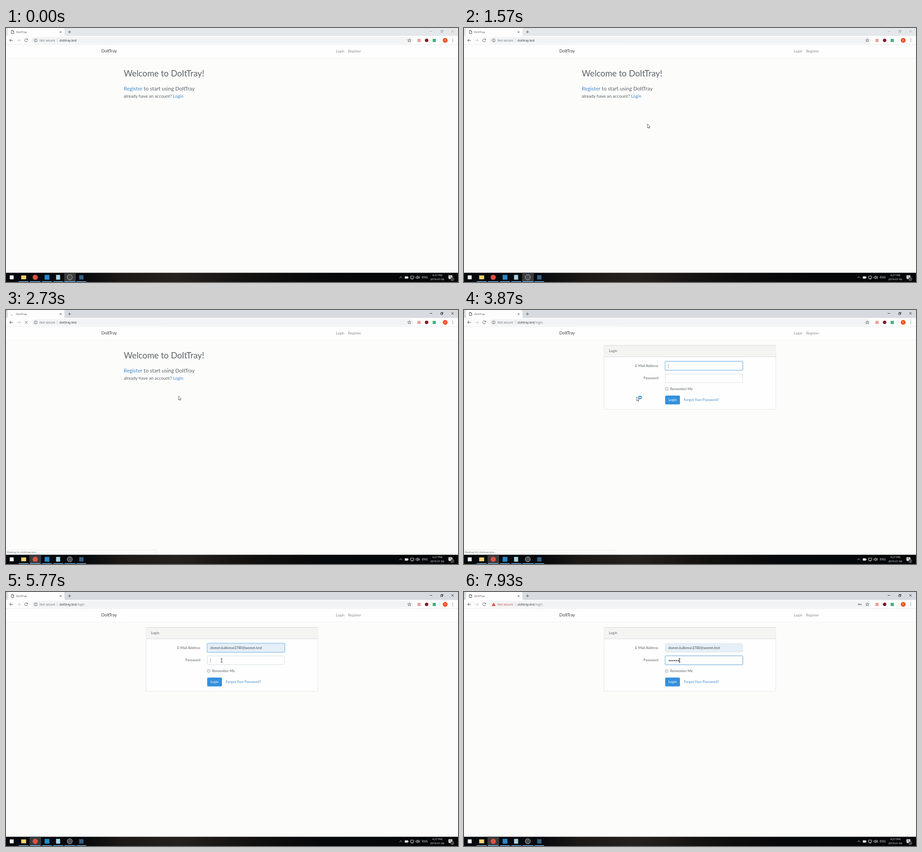
These frames come from a looping animation (998 px wide and 561 px high, 8 s). An HTML page:

```html
<!DOCTYPE html>
<html lang="en">
<head>
<meta charset="utf-8">
<title>DoItTray</title>
<style>
html, body { margin: 0; width: 100%; height: 100%; overflow: hidden; background: #fcfcfb; }
svg { display: block; width: 998px; height: 561px; }
text { font-family: "Open Sans", "Noto Sans", sans-serif; }
.page text { font: 7.8px Lato, sans-serif; fill: #5d6468; }
.page .title { font-size: 18.7px; }
.page .lead { font-size: 11.6px; }
.page .sub { font-size: 9.7px; }
.page .brand { font-size: 9.3px; fill: #3c3f42; }
.page .nav { font-size: 7.95px; fill: #85888a; }
.page .link { fill: #4389cf; }
.page .mail { font-size: 7.6px; fill: #44494d; }
.ui { font-size: 6.8px; fill: #6a6d70; }
.small { font-size: 5.9px; }
.line { fill: none; stroke: #55585c; stroke-width: 1; }
.white { fill: none; stroke: #e8e8e8; stroke-width: .9; }
.field { fill: #fefefe; stroke: #cfd6dc; stroke-width: .8; }
.glow { fill: none; stroke: #a1cbef; stroke-width: 1; }
.halo { fill: none; stroke: #3490dc; stroke-opacity: .28; stroke-width: 2; }

/* on/off states */
.step { animation: 8s step-end infinite; }
.blurred { animation-name: blurred; }
.focused { animation-name: focused; }
.idle { animation-name: idle; }
.loading { animation-name: loading; }
.status { animation-name: status; }
.home { animation-name: home; }
.login { animation-name: login; }
.arrow { animation-name: arrow; }
.beam { animation-name: beam; }
.busy { animation-name: busy; }
.mailcaret { animation-name: mailcaret; }
.suggest { animation-name: suggest; }
.filled { animation-name: filled; }
.safe { animation-name: safe; }
.warned { animation-name: warned; }
.passcaret { animation-name: passcaret; }
.typed { animation-name: typed; }
@keyframes blurred { 0% { opacity: 1 } 26.25%, 100% { opacity: 0 } }
@keyframes focused { 0% { opacity: 0 } 26.25%, 100% { opacity: 1 } }
@keyframes idle { 0% { opacity: 1 } 26.9% { opacity: 0 } 47.1%, 100% { opacity: 1 } }
@keyframes loading { 0% { opacity: 0 } 26.9% { opacity: 1 } 47.1%, 100% { opacity: 0 } }
@keyframes status { 0% { opacity: 0 } 28.1% { opacity: 1 } 49.4%, 100% { opacity: 0 } }
@keyframes home { 0% { opacity: 1 } 45.5%, 100% { opacity: 0 } }
@keyframes login { 0% { opacity: 0 } 45.5%, 100% { opacity: 1 } }
@keyframes arrow { 0% { opacity: 0 } 6.6% { opacity: 1 } 55.5% { opacity: 0 } 62% { opacity: 1 } 69%, 100% { opacity: 0 } }
@keyframes beam { 0% { opacity: 0 } 55.5% { opacity: 1 } 62% { opacity: 0 } 69%, 100% { opacity: 1 } }
@keyframes busy { 0% { opacity: 0 } 45.5% { opacity: 1 } 50.5%, 100% { opacity: 0 } }
@keyframes mailcaret { 0% { opacity: 0 } 45.5% { opacity: 1 } 69%, 100% { opacity: 0 } }
@keyframes suggest { 0% { opacity: 0 } 60.4% { opacity: 1 } 69%, 100% { opacity: 0 } }
@keyframes filled { 0% { opacity: 0 } 69%, 100% { opacity: 1 } }
@keyframes safe { 0% { opacity: 1 } 87.1%, 100% { opacity: 0 } }
@keyframes warned { 0% { opacity: 0 } 87.1%, 100% { opacity: 1 } }
@keyframes passcaret { 0% { opacity: 0 } 72.1% { opacity: 1 } 78.6% { opacity: 0 } 81.6%, 100% { opacity: 1 } }
@keyframes typed {
  0% { transform: none } 81.6% { transform: translateX(4px) } 84.8% { transform: translateX(8px) }
  87.4% { transform: translateX(12px) } 91.6% { transform: translateX(16px) }
  94.3% { transform: translateX(20px) } 97.8%, 100% { transform: translateX(24px) }
}

/* continuous motion */
.mailglow { animation: mailglow 8s linear infinite; }
.passglow { animation: passglow 8s linear infinite; }
.secure { animation: secure 8s linear infinite; }
.spin { animation: spin 1s linear infinite; transform-origin: 14px 8.5px; }
.cursor { animation: cursor 8s ease-in-out infinite; }
@keyframes mailglow { 0%, 72.1% { opacity: 1 } 74.5%, 100% { opacity: 0 } }
@keyframes passglow { 0%, 72.1% { opacity: 0 } 74.5%, 100% { opacity: 1 } }
@keyframes secure { 0%, 81.6% { fill: #6a6d70 } 87.1%, 100% { fill: #d04a42 } }
@keyframes spin { to { transform: rotate(360deg) } }
@keyframes cursor {
  0%, 6.6% { transform: translate(-8px, 330px) }
  16.6% { transform: translate(398px, 222px) }
  19.6% { transform: translate(405px, 212px) }
  24.1%, 27% { transform: translate(379px, 151px) }
  33.5%, 44% { transform: translate(381px, 190px) }
  45.5%, 48.8% { transform: translate(381px, 192px) }
  56.3%, 60.4% { transform: translate(451px, 128.5px) }
  66.6% { transform: translate(470px, 146px) }
  70.3%, 100% { transform: translate(476px, 151px) }
}
</style>
</head>
<body>
<svg viewBox="0 0 998 561">
  <defs>
    <linearGradient id="bar">
      <stop offset="0" stop-color="#05080c"/>
      <stop offset=".18" stop-color="#080a0d"/>
      <stop offset=".25" stop-color="#1b1815"/>
      <stop offset=".38" stop-color="#25211e"/>
      <stop offset=".55" stop-color="#11100f"/>
      <stop offset=".7" stop-color="#07080a"/>
      <stop offset="1" stop-color="#050608"/>
    </linearGradient>
  </defs>
  <rect width="998" height="561" fill="#fcfcfb"/>

  <!-- browser frame -->
  <rect class="step blurred" width="998" height="18" fill="#e4e8ea"/>
  <rect class="step focused" width="998" height="18" fill="#d7dbdf"/>
  <path d="M1 18Q4 18 4 14V3Q4 0 7 0H126Q129 0 129 3V14Q129 18 132 18Z" fill="#fdfdfd"/>
  <rect y="17.5" width="998" height="19" fill="#fdfdfd"/>
  <path d="M0 36.8H998" stroke="#dddfe1" stroke-width=".8"/>
  <path class="line step idle" d="M12 5.2H15L17 7.2V12.3H12ZM15 5.2V7.4H17" stroke-width=".8"/>
  <g class="step loading"><path class="line spin" d="M11 8.5A3 3 0 0 1 13.5 5.5" style="stroke:#85888c"/></g>
  <text class="ui" x="22.5" y="11" style="font-size:6px;fill:#45484b">DoItTray</text>
  <path class="line" d="M118.5 7L122.5 11M122.5 7L118.5 11M137 8.7H143.4M140.2 5.5V11.9"/>
  <path id="winButtons" class="line step blurred" style="stroke:#a0a3a5;stroke-width:.8" d="M935.5 7.5H941M959.8 6.5H963.5V10.2H959.8ZM961 6.5V5.2H964.8V9H963.5M983.3 5L988.3 10M988.3 5L983.3 10"/>
  <path class="line step focused" style="stroke:#26282a;stroke-width:.9" d="M935.5 7.5H941M959.8 6.5H963.5V10.2H959.8ZM961 6.5V5.2H964.8V9H963.5M983.3 5L988.3 10M988.3 5L983.3 10"/>

  <!-- toolbar -->
  <path class="line" d="M15 27.3H8.2M11.3 24L8 27.3L11.3 30.6" style="stroke:#4a4d50"/>
  <path class="line" d="M24.8 27.3H31.5M28.5 24L31.8 27.3L28.5 30.6" style="stroke:#bfc2c4"/>
  <path class="line step idle" d="M47.3 25.3A3.3 3.3 0 1 0 47.7 28.5M48 23.6V26H45.6"/>
  <path class="line step loading" d="M41.8 24.3L47.6 30.1M47.6 24.3L41.8 30.1"/>
  <rect x="56" y="20" width="843" height="14.6" rx="7.3" fill="#f2f3f4"/>
  <g class="step safe">
    <circle class="line" cx="65.5" cy="27.3" r="3.4" style="stroke-width:.8"/>
    <path class="line" d="M65.5 26.8V29.3M65.5 25.1V26"/>
  </g>
  <g class="step warned">
    <path d="M65.5 23.5L69.6 30.8H61.4Z" fill="#d0342c"/>
    <path d="M65.5 26V28.3M65.5 29V29.8" stroke="#fff" stroke-width=".8"/>
    <g class="line"><circle cx="872" cy="27.3" r="1.5"/><path d="M873.5 27.3H878M876.5 27.3V29"/></g>
  </g>
  <text class="ui secure" x="74" y="29.8">Not secure</text>
  <path d="M113.3 23V31.5" stroke="#c8cacc" stroke-width=".8"/>
  <text class="ui" x="118" y="29.8" style="fill:#303336">doittray.test<tspan class="step login" fill="#808386"></tspan></text>
  <text class="ui step login" x="156" y="29.8" style="fill:#808386">/login</text>
  <path class="line" style="stroke-width:.8" d="M890.5 23.4L891.5 26.1L894.3 26.2L892.1 27.9L892.9 30.6L890.5 29.1L888.1 30.6L888.9 27.9L886.7 26.2L889.5 26.1Z"/>
  <rect x="908.5" y="24" width="7" height="7" fill="#eba29c"/>
  <circle cx="928.7" cy="27.3" r="3.8" fill="#7e1b24"/>
  <rect x="942" y="24" width="7" height="7" fill="#43b184"/>
  <path d="M958 22.5V32" stroke="#dfe1e3"/>
  <circle cx="969.7" cy="27.2" r="5.3" fill="#e84e1b"/>
  <text x="969.7" y="29.3" text-anchor="middle" font-size="5.8" fill="#fff">D</text>
  <path d="M986.5 23.7V24.9M986.5 26.7V27.9M986.5 29.7V30.9" stroke="#505356" stroke-width="1.2"/>

  <!-- page -->
  <g class="page">
    <rect y="37.2" width="998" height="29" fill="#fefefe"/>
    <path d="M0 66.7H998" stroke="#f0f0f3"/>
    <text class="brand" x="210.5" y="54.4">DoItTray</text>
    <text class="nav" x="728.5" y="53.6">Login</text>
    <text class="nav" x="755.5" y="53.6">Register</text>

    <g class="step home">
      <text class="title" x="260" y="107">Welcome to DoItTray!</text>
      <text class="lead" x="260" y="138"><tspan class="link">Register</tspan> to start using DoItTray</text>
      <text class="sub" x="260" y="153.7">already have an account? <tspan class="link">Login</tspan></text>
    </g>

    <g class="step login">
      <rect x="309.3" y="78.4" width="379" height="141" rx="1.5" fill="#fefefe" stroke="#e0e1df" stroke-width=".8"/>
      <rect x="309.7" y="78.8" width="378.2" height="24.6" fill="#f4f4f2"/>
      <path d="M309.5 78.3H688.2M309.5 103.5H688.2" stroke="#d3d6de" stroke-width=".9"/>
      <text x="320" y="92.8">Login</text>
      <text x="429" y="125.8" text-anchor="end">E-Mail Address</text>
      <text x="429" y="153.3" text-anchor="end">Password</text>

      <rect class="field" x="444.5" y="113.8" width="170.6" height="19" rx="2"/>
      <g class="step filled">
        <rect x="445" y="114.3" width="169.6" height="18" rx="1.5" fill="#e6eff8"/>
        <text class="mail" x="451" y="126.2">domen.kallomar2780@womm.test</text>
      </g>
      <g class="mailglow">
        <rect class="halo" x="443.8" y="113.1" width="172" height="20.4" rx="2.5"/>
        <rect class="glow" x="444.5" y="113.8" width="170.6" height="19" rx="2"/>
      </g>
      <path class="step mailcaret" d="M451.2 118.5V128.5" stroke="#777" stroke-width=".7"/>

      <rect class="field" x="444.5" y="141.2" width="170.6" height="19" rx="2"/>
      <g fill="#3f4347">
        <circle cx="453.3" cy="151.6" r="1.45"/><circle cx="457.3" cy="151.6" r="1.45"/>
        <circle cx="461.3" cy="151.6" r="1.45"/><circle cx="465.3" cy="151.6" r="1.45"/>
        <circle cx="469.3" cy="151.6" r="1.45"/><circle cx="473.3" cy="151.6" r="1.45"/>
      </g>
      <g class="step typed">
        <rect x="451" y="146" width="28" height="10" fill="#fefefe"/>
        <path class="step passcaret" d="M451.3 146.3V156.3" stroke="#777" stroke-width=".7"/>
      </g>
      <g class="passglow">
        <rect class="halo" x="443.8" y="140.5" width="172" height="20.4" rx="2.5"/>
        <rect class="glow" x="444.5" y="141.2" width="170.6" height="19" rx="2"/>
      </g>

      <rect x="444.6" y="171.6" width="5.8" height="5.8" rx=".8" fill="#ededed" stroke="#999" stroke-width=".8"/>
      <text x="455" y="177.2">Remember Me</text>
      <rect x="444.2" y="189" width="32.6" height="19.4" rx="2" fill="#3490dc"/>
      <text x="460.5" y="201.3" text-anchor="middle" style="fill:#fff">Login</text>
      <text class="link" x="485.3" y="201.3">Forgot Your Password?</text>

      <g class="step suggest">
        <rect x="444.5" y="134.3" width="170.6" height="20" fill="#fefefe" stroke="#c9ccd0" stroke-width=".8"/>
        <text class="mail" x="451" y="146.8">domen.kallomar2780@womm.test</text>
      </g>
    </g>
  </g>

  <g class="step status">
    <path d="M0 529.8H332V541H0Z" fill="#fbfbfa" stroke="#e8e8e2" stroke-width=".8"/>
    <text class="ui small" x="1.8" y="537.4">Waiting for doittray.test...</text>
  </g>

  <!-- taskbar -->
  <rect y="540.6" width="998" height="20.4" fill="url(#bar)"/>
  <rect class="step blurred" x="128.5" y="540.6" width="25.5" height="20.4" fill="#393b3d"/>
  <rect class="step focused" x="52" y="540.6" width="25.5" height="20.4" fill="#393b3d"/>
  <path d="M28 560.2H50M53 560.2H76M79.5 560.2H101M104.5 560.2H126.5M129 560.2H153.5M155.5 560.2H177" stroke="#76b5e6" stroke-width="1.5"/>
  <rect x="8.3" y="546.4" width="8.6" height="8.6" fill="#f4f4f4"/>
  <rect x="33.5" y="546.5" width="11" height="8.5" fill="#f3d273"/>
  <circle cx="64.5" cy="550.6" r="5.7" fill="#dd5144"/>
  <rect x="85.3" y="545.3" width="10.5" height="10.5" fill="#2489ca"/>
  <rect x="110.5" y="545.3" width="9" height="10.5" fill="#a9d3e2"/>
  <circle cx="140.8" cy="550.6" r="5.7" fill="#4a4a4d" stroke="#d4d4d4" stroke-width=".8"/>
  <rect x="161.5" y="546" width="9.5" height="9.5" fill="#345f80"/>
  <path class="white" d="M868.8 552.2L871.7 549.3L874.6 552.2"/>
  <path d="M880.5 548.5H887.5V553.5H880.5ZM887.8 550H888.8V552H887.8Z" fill="#e8e8e8"/>
  <path class="white" d="M893.3 548H900.2V553H893.3ZM895 554.8H898.5M905 549.5H906.7L909 547.5V554L906.7 552.2H905ZM910.5 549Q911.7 550.7 910.5 552.5M912 547.8Q913.8 550.7 912 553.7"/>
  <g fill="#f2f2f2" class="small">
    <text x="918.3" y="552.8" font-size="6.2">ENG</text>
    <text x="952.2" y="548.3" text-anchor="middle">4:27 PM</text>
    <text x="952.2" y="557.4" text-anchor="middle">2019-01-06</text>
  </g>
  <path d="M977 546.3H985.5V553.3H981L978.5 555.5V553.3H977Z" fill="#f0f0f0"/>
  <path d="M978.5 548.5H984M978.5 550.5H984" stroke="#333" stroke-width=".7"/>
  <circle cx="985.3" cy="554.5" r="3.6" fill="#25272a" stroke="#ccc" stroke-width=".6"/>
  <text x="985.3" y="556.5" text-anchor="middle" font-size="5" fill="#fff">1</text>

  <!-- pointer -->
  <g class="cursor">
    <g class="step arrow">
      <path d="M0 0V8.6L2 6.8L3.4 9.9L4.8 9.3L3.5 6.3H6Z" fill="#fff" stroke="#3c3e4a" stroke-width=".75"/>
      <circle class="step busy" cx="7.6" cy="1" r="2.8" fill="#fff" stroke="#2c8fd4" stroke-width="2.1"/>
    </g>
    <path class="step beam" d="M-1.9 -3.8H-.5L0 -3.4L.5 -3.8H1.9M0 -3.4V3.6M-1.9 4H-.5L0 3.6L.5 4H1.9" fill="none" stroke="#2a2c2e" stroke-width="1"/>
  </g>
</svg>
</body>
</html>
```
